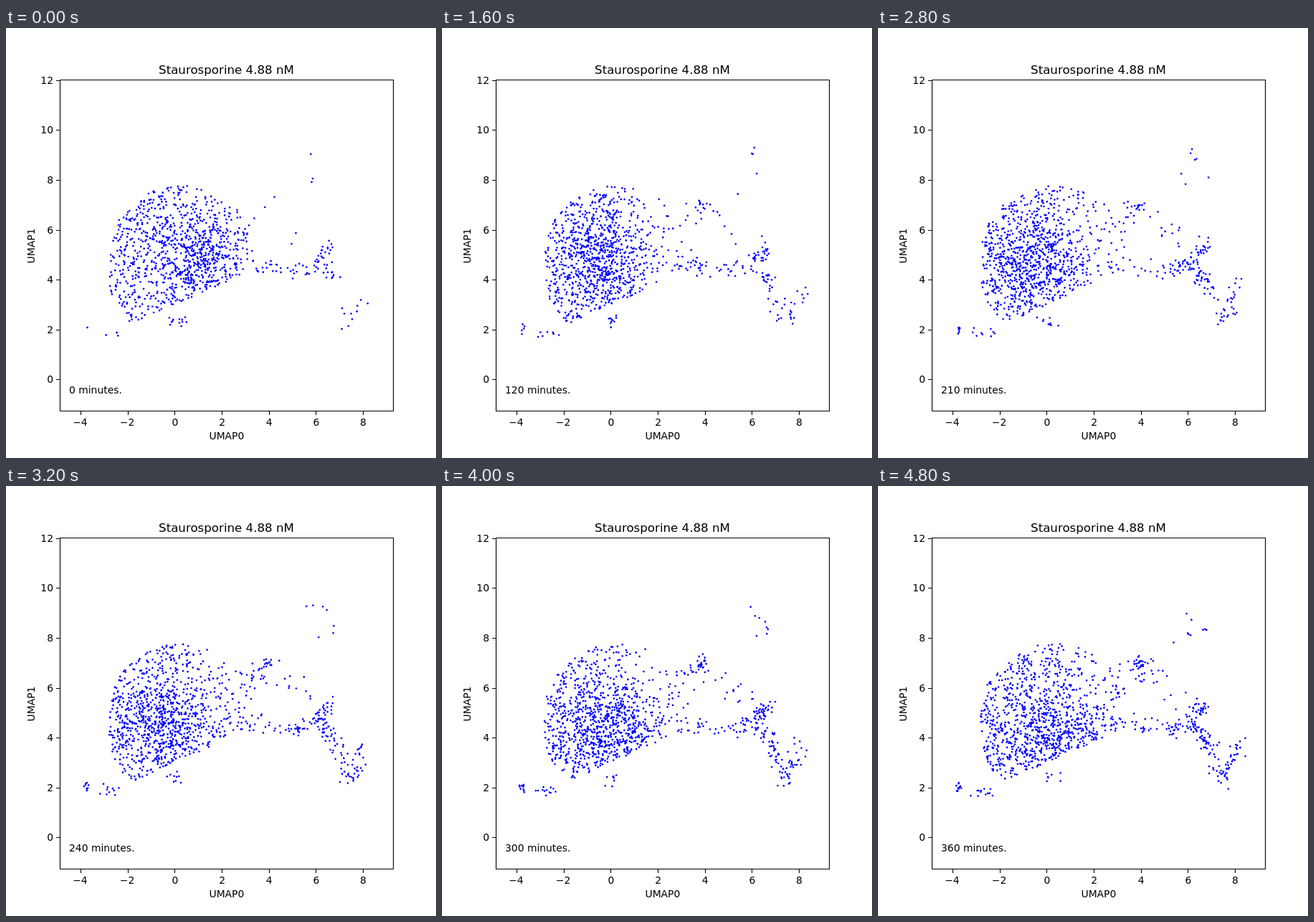
Write an HTML page that moves like this. It is 600 px wide and 600 px high and loops after 5200 ms.

```html
<!DOCTYPE html>
<html lang="en">
<head>
<meta charset="utf-8">
<title>UMAP scatter over time</title>
<style>
html, body { margin: 0; width: 100%; height: 100%; overflow: hidden; background: #fff; }
svg { display: block; width: 100%; height: 100%; }
text { font: 13.89px "DejaVu Sans", sans-serif; fill: #000; }
.title { font-size: 16.67px; }
.mid { text-anchor: middle; }
.end { text-anchor: end; }
#axes { fill: none; stroke: #000; stroke-width: 1.11; }
#dots { fill: none; stroke: #00f; stroke-width: 2.7; stroke-linecap: round; }
</style>
</head>
<body>
<svg viewBox="0 0 600 600">
  <rect width="600" height="600" fill="#fff"/>
  <path id="dots"/>
  <path id="axes"/>
  <g id="labels"></g>
  <text class="title mid" x="307.5" y="64">Staurosporine 4.88 nM</text>
  <text class="mid" x="307.9" y="574">UMAP0</text>
  <text class="mid" transform="translate(40 304) rotate(-90)">UMAP1</text>
  <text id="clock" x="88" y="510"></text>
</svg>
<script>
const STEP = 400, STEPS = 13;
const $ = id => document.getElementById(id);
const mix = (a, b, k) => a + (b - a) * k;

function seeded(s) {
  return () => {
    s = s + 0x6D2B79F5 | 0;
    let t = Math.imul(s ^ s >>> 15, 1 | s);
    t = t + Math.imul(t ^ t >>> 7, 61 | t) ^ t;
    return ((t ^ t >>> 14) >>> 0) / 4294967296;
  };
}

// Main cloud: a dome above, a squarer base cut by a rising slope
function inCloud(x, y) {
  const below = y > 318;
  const power = below ? 3 : 2;
  const dx = Math.abs(x - 246) / 103, dy = Math.abs(y - 318) / (below ? 106 : 98);
  return dx ** power + dy ** power < 1 && y < 427 - 0.45 * (x - 145);
}

function scatter(step) {
  const p = step / (STEPS - 1);
  const rnd = seeded(977 + step * 131);
  const bell = () => (rnd() + rnd() + rnd() - 1.5) * 2;
  let d = "";
  const dot = (x, y) => d += `M${x.toFixed(1)} ${y.toFixed(1)}h0`;

  const fill = (count, pick, keep) => {
    while (count > 0) {
      const [x, y] = pick();
      if (inCloud(x, y) && keep(x)) { dot(x, y); count--; }
    }
  };
  // dots along a bent line, more or fewer as time goes on
  const strand = (points, jitter, first, last) => {
    for (let n = Math.round(mix(first, last, p)); n > 0; n--) {
      const i = Math.floor(rnd() * (points.length - 1)), k = rnd();
      const [a, b] = points.slice(i, i + 2);
      dot(mix(a[0], b[0], k) + bell() * jitter, mix(a[1], b[1], k) + bell() * jitter);
    }
  };

  // even cover that thins out to the right
  fill(mix(560, 510, p), () => [mix(140, 350, rnd()), mix(218, 420, rnd())],
    x => rnd() < Math.exp((230 - x) / 60));
  // dense core that slides left, then drifts back and down
  const cx = 205 + 68 * Math.exp(-6 * p) + 40 * p * p;
  const cy = 318 + 27 * p, spread = mix(29, 41, p);
  fill(mix(430, 480, p), () => [cx + bell() * spread, cy + bell() * 33], () => true);

  strand([[318, 328], [405, 340], [440, 325], [453, 302]], 6, 60, 98);
  strand([[440, 338], [462, 358], [481, 415], [502, 358]], 6, 20, 100);
  strand([[325, 285], [363, 248], [428, 306]], 10, 6, 45);
  strand([[360, 249], [368, 247]], 3, 1, 18);
  strand([[112, 416], [113, 424]], 2, 1, 12);
  strand([[134, 426], [160, 425]], 4, 4, 13);
  strand([[228, 408], [248, 406]], 5, 12, 7);
  strand([[395, 225], [462, 197], [428, 166]], 5, 3, 9);
  return d;
}

function drawAxes() {
  let d = "M75.5 72.5H540.5V534.5H75.5Z", labels = "";
  for (let i = 0; i < 7; i++) {
    const x = 104.2 + 65.62 * i, v = 2 * i - 4;
    const y = Math.round(490.4 - 69.6 * i) + 0.5;
    d += `M${Math.round(x) + 0.5} 535v5M70 ${y}h5`;
    // the minus sign has a wide left bearing
    const [name, nudge] = v < 0 ? ["\u2212" + -v, -0.73] : [v, 0.57];
    labels += `<text class="mid" x="${x + nudge}" y="555">${name}</text>` +
      `<text class="end" x="66" y="${y + 4.5}">${2 * i}</text>`;
  }
  $("axes").setAttribute("d", d);
  $("labels").innerHTML = labels;
}

const clouds = Array.from({ length: STEPS }, (_, i) => scatter(i));
let shown = -1;

function render(ms) {
  const step = Math.floor(ms / STEP) % STEPS;
  if (step === shown) return;
  shown = step;
  $("dots").setAttribute("d", clouds[step]);
  $("clock").textContent = `${step * 30} minutes.`;
}

drawAxes();
render(0);
const start = performance.now();
function tick() {
  render(performance.now() - start);
  requestAnimationFrame(tick);
}
requestAnimationFrame(tick);
</script>
</body>
</html>
```
